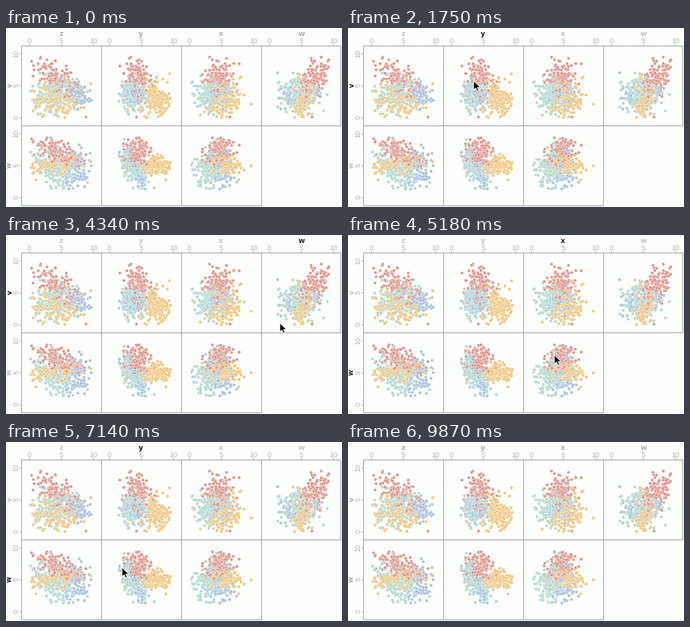
These frames come from a looping animation (420x224 px, 9.94 s). A matplotlib script:

```python
import matplotlib.pyplot as plt
import numpy as np
from matplotlib.animation import FuncAnimation
from matplotlib.patches import Polygon

W, H, DPI = 420, 224, 100
STEP, FRAMES = 70, 142
LEFT, TOP, CELL, PAD = 19.5, 22.5, 100, 9.5
COLS, ROWS = "zyxw", "vw"
VARS = "zyxwv"

RED, TEAL, BLUE, ORANGE = "#e0938a", "#b0d8d3", "#a8c0e0", "#f1c47c"
IDLE, FADED, ACTIVE = "#a0a0a0", "#b9b9b9", "#000000"
LINE, TICK = "#aaaaaa", "#b4b4b4"

# colour, count, means and deviations (z, y, x, w, v), correlated pairs
CLUSTERS = [
    (RED, 150, (4.4, 4.4, 4.6, 7.0, 5.9), (1.7, 1.1, 1.1, 1.2, 1.6),
     {"zw": -.6, "zv": -.65, "wv": .55}),
    (TEAL, 165, (4.2, 3.9, 3.2, 4.4, 3.8), (1.6, 1, 1.2, 1.5, 1.3),
     {"zw": -.4, "yw": -.55}),
    (BLUE, 90, (7.6, 3.9, 5, 4.9, 3.6), (1.1, .9, 1, 1.5, 1.2),
     {"zw": .3, "zv": -.5, "yw": -.65}),
    (ORANGE, 165, (4.5, 7.1, 5.1, 5, 3), (2, 1.4, 1.6, .7, 1.5),
     {"zw": .4}),
]

# stops of the pointer tip: time in ms, x, y
STOPS = np.array([(400, -20, 80), (1750, 157, 66), (3430, 322, 77),
                  (4250, 346, 106), (5180, 258, 150), (7140, 145, 157),
                  (8400, 65, 134), (9500, -20, 150)])
TIMES, TIPS = STOPS[:, 0], STOPS[:, 1:]
SPEED = np.gradient(TIPS, TIMES, axis=0)
ARROW = np.array([(0, 0), (0, 11.5), (2.7, 9.1), (4.6, 13.2),
                  (6.5, 12.3), (4.7, 8.4), (8.3, 8.2)])


def make_data():
    rng = np.random.default_rng(12)
    points, colors = [], []
    for color, count, mean, dev, pairs in CLUSTERS:
        corr = np.eye(5)
        for (a, b), r in pairs.items():
            i, j = VARS.index(a), VARS.index(b)
            corr[i, j] = corr[j, i] = r
        draw = rng.multivariate_normal(mean, corr * np.outer(dev, dev), count * 2)
        inside = np.all((draw >= 0) & (draw <= 10), axis=1)
        kept = draw[inside][:count]
        points.extend(kept)
        colors += [color] * len(kept)
    order = rng.permutation(len(points))
    return np.array(points)[order], np.array(colors)[order]


def px(col, value):
    return LEFT + col * CELL + PAD + 8 * value


def py(row, value):
    return TOP + (row + 1) * CELL - PAD - 1 - 8 * value


def text(x, y, s, size, color, **kw):
    align = "center" if "rotation" in kw else "center_baseline"
    return ax.text(x, y, s, fontsize=size * 72 / DPI, color=color,
                   family="Liberation Sans", ha="center", va=align, **kw)


def line(xs, ys, color=LINE):
    ax.plot(xs, ys, color=color, lw=.72, solid_capstyle="butt",
            snap=False, zorder=1)


def cursor_at(ms):
    """Smooth Hermite path through the stops."""
    ms = np.clip(ms, TIMES[0], TIMES[-1])
    k = min(np.searchsorted(TIMES, ms, "right"), len(TIMES) - 1) - 1
    span = TIMES[k + 1] - TIMES[k]
    u = (ms - TIMES[k]) / span
    ease = u * u * (3 - 2 * u)
    return (TIPS[k] + (TIPS[k + 1] - TIPS[k]) * ease
            + span * u * (1 - u) * ((1 - u) * SPEED[k] - u * SPEED[k + 1]))


def hovered(pos):
    col, row = ((pos - (LEFT, TOP)) // CELL).astype(int)
    inside = 0 <= col < 4 and 0 <= row < 2 and (col, row) != (3, 1)
    return (col, row) if inside else None


fig = plt.figure(figsize=(W / DPI, H / DPI), dpi=DPI, facecolor="#fdfffc")
ax = fig.add_axes([0, 0, 1, 1])
ax.set(xlim=(0, W), ylim=(H, 0))
ax.axis("off")

data, colors = make_data()
for row, yvar in enumerate(ROWS):
    for col, xvar in enumerate(COLS):
        if xvar == yvar:
            continue
        x0, y0 = LEFT + col * CELL, TOP + row * CELL
        x1, y1 = x0 + CELL - (col == 3), y0 + CELL
        line([x0, x1, x1, x0, x0], [y0, y0, y1, y1, y0])
        ax.scatter(px(col, data[:, VARS.index(xvar)]),
                   py(row, data[:, VARS.index(yvar)]),
                   s=7.4, c=colors, edgecolors="#fdfffc", linewidths=.22,
                   zorder=2)

for value in (0, 5, 10):
    for col in range(4):
        x = px(col, value)
        line([x + .5, x + .5], [20, TOP], TICK)
        text(x, 15.5, str(value), 9, TICK)
    for row in range(2):
        y = py(row, value)
        line([17, LEFT], [y + .5, y + .5], TICK)
        text(13, y, str(value), 9, TICK, rotation=90)

col_titles = [text(px(c, 5), 6, v, 9.5, IDLE, weight="bold")
              for c, v in enumerate(COLS)]
row_titles = [text(5, py(r, 5), v, 9, IDLE, weight="bold", rotation=90)
              for r, v in enumerate(ROWS)]
cursor = Polygon(ARROW, closed=True, fc="black", ec="white", lw=.6, zorder=5)
ax.add_patch(cursor)


def update(i):
    cursor.set_xy(ARROW + cursor_at(i * STEP))
    # the highlight follows the pointer one step late
    cell = hovered(cursor_at((i - 1) * STEP))
    for axis, titles in enumerate((col_titles, row_titles)):
        for k, title in enumerate(titles):
            if cell is None:
                title.set_color(IDLE)
            else:
                title.set_color(ACTIVE if cell[axis] == k else FADED)
    return [cursor, *col_titles, *row_titles]


anim = FuncAnimation(fig, update, frames=FRAMES, interval=STEP,
                     repeat=True, repeat_delay=0)
plt.show()
```
